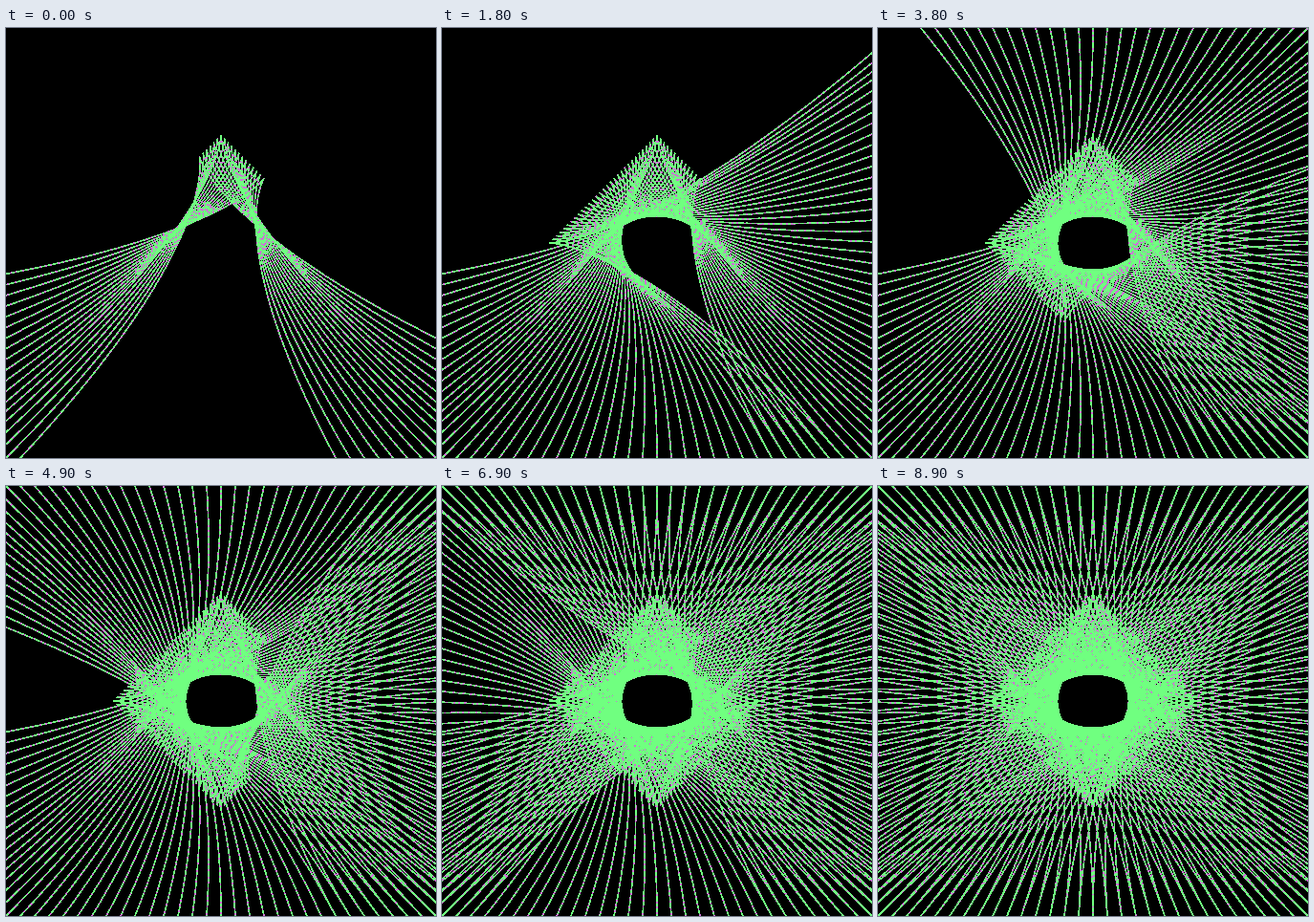
An HTML page for the animation above (9 s loop, 450 by 450 pixels).

```html
<!DOCTYPE html>
<html lang="en">
<head>
<meta charset="utf-8">
<title>String curves</title>
<style>
  html, body { margin: 0; height: 100%; overflow: hidden; background: #000; }
  svg { display: block; width: 100vw; height: 100vh; }
  path { fill: none; stroke-width: 1.7; shape-rendering: crispEdges; }
  #under { stroke: #d070d8; }
  #over { stroke: #70ff80; stroke-dasharray: 4 2 3 2 6 2; }
</style>
</head>
<body>
<svg viewBox="-225 -225 450 450">
  <g id="under"></g>
  <g id="over"></g>
</svg>
<script>
const LOOP = 9000, TICK = 100;
const STEP = 15, COLS = 40, ROWS = 30, TOTAL = 2 * (COLS + ROWS);
const W = COLS * STEP / 2, H = ROWS * STEP / 2;

// Point on a 600 x 450 rectangle, counterclockwise from its bottom left corner.
function rim(i) {
  i = (i + TOTAL) % TOTAL;
  if (i < COLS) return [i * STEP - W, H];
  i -= COLS;
  if (i < ROWS) return [W, H - i * STEP];
  i -= ROWS;
  if (i < COLS) return [W - i * STEP, -H];
  return [-W, (i - COLS) * STEP - H];
}

// Each end's handle lies opposite it, which folds the curve into a cusp.
function curve(i) {
  const [ax, ay] = rim(i), [bx, by] = rim(i + COLS);
  return `M${ax} ${ay}C${-ax} ${-ay} ${-bx} ${-by} ${bx} ${by}`;
}

// Staggered dashes let crossing strokes fill each other's gaps.
const layers = [...document.querySelectorAll("g")];
for (const layer of layers)
  for (let n = 0; n < TOTAL; n++)
    layer.innerHTML += `<path d="${curve(n - 12)}" stroke-dashoffset="${n * 7}"/>`;

const start = performance.now();
let shown = -1;

function draw() {
  const tick = Math.floor((performance.now() - start) % LOOP / TICK);
  const count = Math.min(TOTAL, 19 + Math.floor(1.46 * tick + 0.95));
  if (count !== shown) {
    shown = count;
    for (const layer of layers)
      [...layer.children].forEach((path, n) => path.style.display = n < count ? "" : "none");
  }
  requestAnimationFrame(draw);
}
draw();
</script>
</body>
</html>
```
